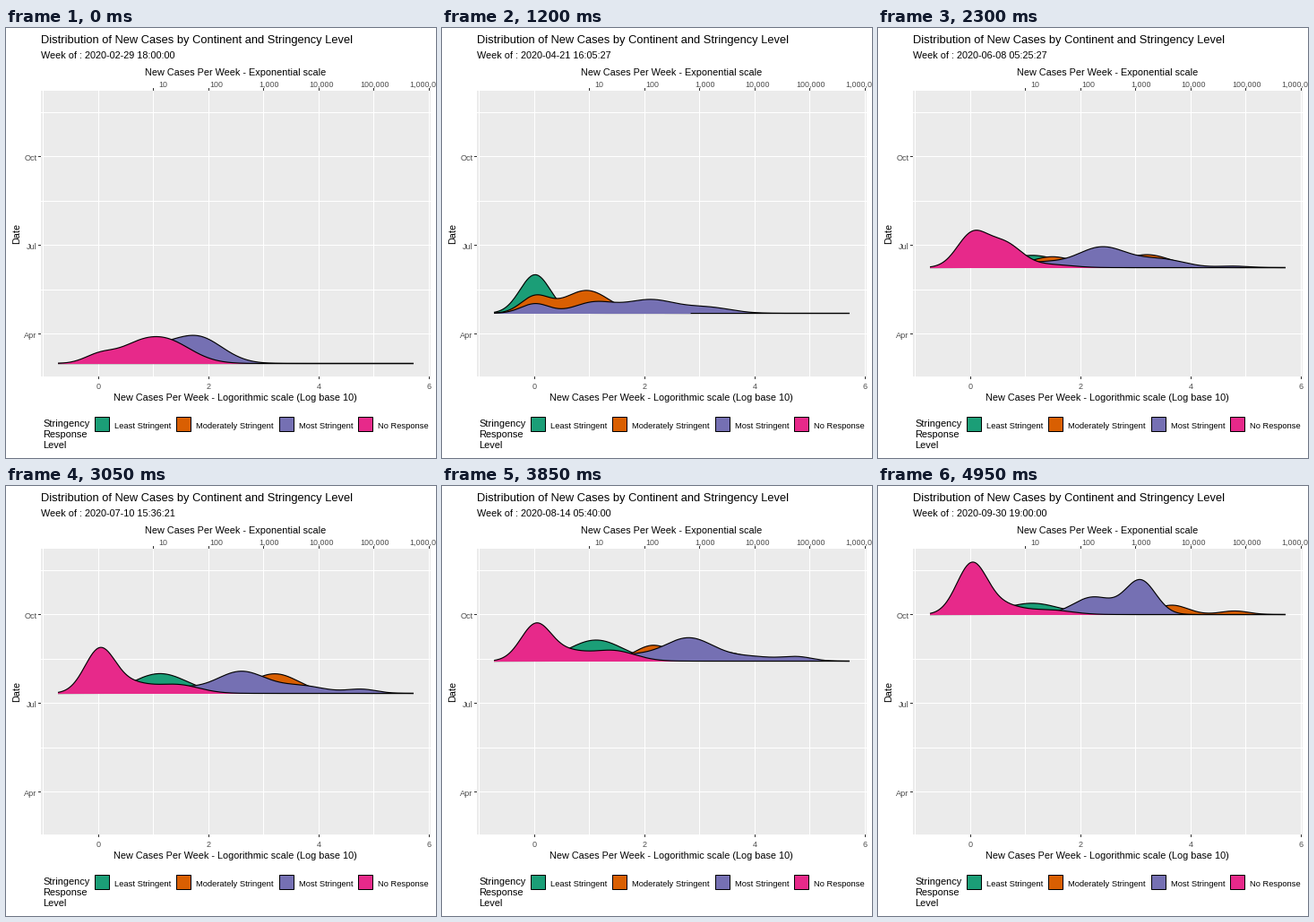
Write a matplotlib script that moves like this. It is 480 px wide and 480 px high and loops after 5 s.

```python
import numpy as np
import matplotlib
import matplotlib.pyplot as plt
from matplotlib.animation import FuncAnimation
from matplotlib.patches import Polygon, Rectangle

SIZE, DPI = 480, 100
FRAMES, STEP_MS = 100, 50
LAST = FRAMES - 1
PX = 72 / DPI  # points per pixel

matplotlib.rcParams["font.family"] = "Liberation Sans"

# Monthly states, each reached on a whole step
months = np.arange("2020-03", "2020-11", dtype="datetime64[M]")
days = (months.astype("datetime64[D]") - np.datetime64("2020-03-01")).astype(int)
month_steps = np.rint(days * LAST / days[-1]).astype(int)
APRIL, JUNE = month_steps[1], month_steps[3]

xs = np.linspace(58, 455, 398)


def bump(centre, height, spread):
    return height * np.exp(-0.5 * ((xs - centre) / spread) ** 2)


def arch(u, start, end):
    """Rise and fall between two moments, zero outside."""
    return np.sin(np.pi * np.clip((u - start) / (end - start), 0, 1))


def track(u, *points):
    return np.interp(u, *zip(*points))


# Ridge heights in pixels; u runs from 0 to 1 over the loop
def least(u):
    return (bump(104, 44 * arch(u, 0, 0.43), 17)
            + bump(172, 24 * arch(u, 0.3, 1.15), 30))


def moderate(u):
    late = track(u, (0.7, 0), (1, 1))
    return (bump(104, 19 * arch(u, 0, 0.43), 16)
            + bump(125 + 150 * u, 26 * arch(u, 0, 0.55), 25)
            + bump(300, 22 * arch(u, 0.35, 0.85), 27)
            + bump(235, 20 * arch(u, 0.62, 1.1), 20)
            + bump(328, 10.5 * late, 18)
            + bump(398, 4 * late, 16))


def most(u):
    main = track(u, (0, 30), (0.24, 15), (0.46, 23), (0.78, 26), (1, 38))
    side = track(u, (0, 13), (0.24, 12), (0.46, 5.5), (0.8, 6), (1, 19.5))
    spread = track(u, (0.8, 28), (1, 17))
    return (bump(104, 11 * arch(u, 0, 0.43), 16)
            + bump(213 + 80 * u, main, spread)
            + bump(165 + 75 * u ** 2, side, 22)
            + bump(275 + 90 * u, 9 * arch(u, 0, 0.95), 26)
            + bump(397, 5 * arch(u, 0.4, 1), 17))


def none(u):
    peak = track(u, (0, 10), (0.46, 36), (0.62, 50), (0.78, 41), (1, 57))
    shoulder = track(u, (0, 7), (0.43, 30), (0.62, 9), (1, 9))
    return (bump(105, peak, 17)
            + bump(141, shoulder, 19)
            + bump(174, track(u, (0, 28), (0.43, 0)), 30)
            + bump(190, 12 * arch(u, 0.4, 1.1), 25))


LEVELS = [
    ("Least Stringent", "#1B9E77", least),
    ("Moderately Stringent", "#D95F02", moderate),
    ("Most Stringent", "#7570B3", most),
    ("No Response", "#E7298A", none),
]


def baseline(step):
    return round(374.3 - 1.081 * np.interp(step, month_steps, days)) + 0.5


def clock(step):
    """Local time text, with the spring clock change."""
    utc = np.datetime64("2020-03-01T00:00:00") + np.timedelta64(
        int(days[-1]) * 86400 * step // LAST, "s")
    summer = utc >= np.datetime64("2020-03-08T08:00:00")
    local = utc - np.timedelta64(5 if summer else 6, "h")
    return "Week of : " + str(local).replace("T", " ")


fig = plt.figure(figsize=(SIZE / DPI, SIZE / DPI), dpi=DPI, facecolor="white")
ax = fig.add_axes([0, 0, 1, 1])
ax.set_xlim(0, SIZE)
ax.set_ylim(SIZE, 0)
ax.axis("off")


def label(x, y, text, size, color="black", **kw):
    return ax.text(x, y, text, fontsize=size * PX, color=color, zorder=20, **kw)


def line(x, y, color, width=1.0, z=2):
    return ax.plot(x, y, color=color, lw=width * PX, zorder=z, snap=False,
                   solid_capstyle="butt")[0]


def box(x, y, w, h, color, edge="none"):
    ax.add_patch(Rectangle((x, y), w, h, facecolor=color, edgecolor=edge,
                           lw=PX, snap=False, zorder=1))


# Panel and grid
TICK, GREY = "#333333", "#4D4D4D"
box(39, 70, 435, 319, "#EBEBEB")
cols = np.floor(103.4 + 61.5 * np.arange(-1, 7)) + 0.5
rows = np.floor(94.1 + 49.5 * np.arange(6)) + 0.5
for x in cols:
    line([x, x], [70, 389], "white")
for y in rows:
    line([39, 474], [y, y], "white")

# Axes
for x, text in zip(cols[1::2], "0246"):
    line([x, x], [389, 392], TICK)
    label(x - 0.5, 403, text, 9, GREY, ha="center")
for i, x in enumerate(cols[2:]):
    line([x, x], [67, 70], TICK)
    label(175.5 + 59 * i, 65.5, f"{10 ** (i + 1):,}", 8.9, GREY, ha="center")
for y, text in zip(rows[1::2], ("Oct", "Jul", "Apr")):
    line([36, 39], [y, y], TICK)
    label(34.5, y + 4.5, text, 9.2, GREY, ha="right")

# Titles
label(39, 17, "Distribution of New Cases by Continent and Stringency Level", 12.93)
stamp = label(39, 34, "", 10.9)
label(256.5, 53, "New Cases Per Week - Exponential scale", 10.85, ha="center")
label(255.5, 416, "New Cases Per Week - Logorithmic scale (Log base 10)", 10.9,
      ha="center")
label(12, 229.5, "Date", 10.9, ha="center", va="center", rotation=90)

# Legend
for i, text in enumerate(("Stringency", "Response", "Level")):
    label(41, 445 + 12 * i, text, 11)
for x, (text, color, _) in zip((99.5, 190.5, 305.5, 393.5), LEVELS):
    box(x, 434.5, 16, 16, color, "black")
    label(x + 21.5, 447, text, 9.35)

# Ridges, later levels in front
ridges = []
for z, (_, color, _) in enumerate(LEVELS):
    area = Polygon(np.zeros((3, 2)), facecolor=color, edgecolor="none",
                   snap=False, zorder=5 + 2 * z)
    ax.add_patch(area)
    ridges.append((area, line([], [], "black", 1.15, 6 + 2 * z)))
floor = line([], [], "black", 1.0, 10.5)


def place(ridge, base, height):
    area, edge = ridge
    top = base - height
    bottom = base + 0.5
    area.set_xy([*zip(xs, top), (xs[-1], bottom), (xs[0], bottom)])
    edge.set_data(xs, top)


def draw(step):
    base, u = baseline(step), step / LAST
    for ridge, (_, _, shape) in zip(ridges[:3], LEVELS):
        place(ridge, base, shape(u))

    # The last level waits at its first date, leaves, then rejoins
    if step < APRIL:
        place(ridges[3], baseline(0), none(0))
    else:
        place(ridges[3], base, none(u))
    for part in ridges[3]:
        part.set_visible(step < APRIL or step >= JUNE)

    floor.set_data([250 + 1.15 * step, 455], [base, base])
    floor.set_visible(step < JUNE)
    stamp.set_text(clock(step))
    return []


anim = FuncAnimation(fig, draw, frames=FRAMES, interval=STEP_MS,
                     init_func=lambda: draw(0), repeat=True, repeat_delay=0,
                     blit=False)
plt.show()
```
